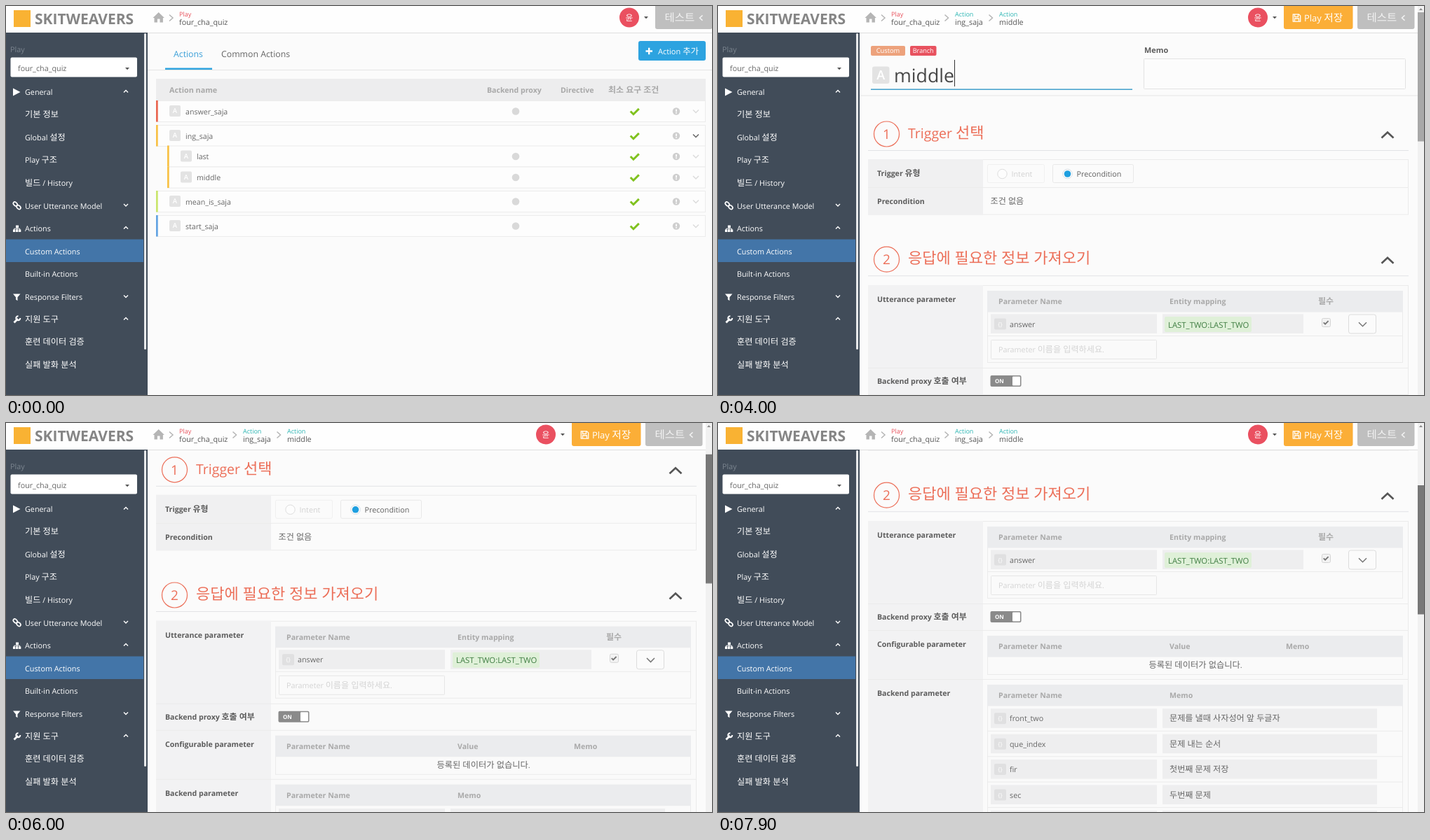
Recreate the animation shown at these times as an HTML page. Size 1007 by 556 pixels, loop 8 s.

```html
<!DOCTYPE html>
<html lang="ko">
<head>
<meta charset="utf-8">
<title>Action editor</title>
<style>
html, body { margin: 0; width: 100%; height: 100%; overflow: hidden; background: #fbfbfb; }
svg { display: block; width: 1007px; height: 556px; }
text { font-family: "Open Sans", "Noto Sans CJK KR", "Noto Sans CJK", sans-serif; text-rendering: geometricPrecision; white-space: pre; }
.ko { font-size: 1.13em; }
.list { animation: list 8s step-end infinite; }
.detail { animation: detail 8s step-end infinite; }
.body { animation: body 8s step-end infinite; }
.loader { animation: loader 8s step-end infinite; }
.caret { animation: caret 8s step-end infinite; }
.focus { animation: focus 8s linear infinite; }
.scroll { animation: scroll 8s infinite; }
.thumb { animation: thumb 8s infinite; }
.grip { animation: grip 8s step-end infinite; }
.spin { animation: spin 1s steps(10) infinite; transform-origin: 599.5px 287px; }
@keyframes list { 0% { visibility: visible } 31.25%, 100% { visibility: hidden } }
@keyframes detail { 0% { visibility: hidden } 31.25%, 100% { visibility: visible } }
@keyframes body { 0% { visibility: hidden } 41.25%, 100% { visibility: visible } }
@keyframes loader { 0% { visibility: hidden } 31.25% { visibility: visible } 41.25%, 100% { visibility: hidden } }
@keyframes caret {
  0%, 42.5%, 55%, 67.5%, 100% { visibility: hidden }
  36.25%, 48.75%, 61.25% { visibility: visible }
}
@keyframes focus { 0%, 37.5% { opacity: 0 } 41.25%, 100% { opacity: 1 } }
@keyframes scroll {
  0%, 57.5% { transform: translateY(0); animation-timing-function: steps(4) }
  62.5% { transform: translateY(-50px); animation-timing-function: steps(6) }
  70% { transform: translateY(-78px); animation-timing-function: steps(9) }
  81.25% { transform: translateY(-164px); animation-timing-function: steps(8) }
  91.25% { transform: translateY(-215px); animation-timing-function: steps(6) }
  98.75% { transform: translateY(-259px); animation-timing-function: steps(1) }
  100% { transform: translateY(-266px) }
}
@keyframes thumb {
  0%, 57.5% { transform: translateY(0); animation-timing-function: steps(4) }
  62.5% { transform: translateY(15px); animation-timing-function: steps(6) }
  70% { transform: translateY(24px); animation-timing-function: steps(9) }
  81.25% { transform: translateY(50.5px); animation-timing-function: steps(8) }
  91.25% { transform: translateY(66.5px); animation-timing-function: steps(6) }
  98.75% { transform: translateY(80px); animation-timing-function: steps(1) }
  100% { transform: translateY(82px) }
}
@keyframes grip { 0% { fill: #c1c1c1 } 50% { fill: #a8a8a8 } 58.75%, 100% { fill: #787878 } }
@keyframes spin { to { transform: rotate(360deg) } }
</style>
</head>
<body>
<svg id="stage" viewBox="0 0 1007 556" xmlns="http://www.w3.org/2000/svg"></svg>
<script>
const text = (x, y, s, fill = '#555', size = 10.75, more = '') =>
  `<text x="${x}" y="${y}" fill="${fill}" font-size="${size}" ${more}>` +
  s.replace(/[가-힣]+( [가-힣]+)*/g, k => `<tspan class="ko">${k}</tspan>`) + '</text>';
const bold = (x, y, s, fill = '#5c5c5c', size = 10.6) => text(x, y, s, fill, size, 'font-weight="700"');
const mid = (x, y, s, fill, size, more = '') => text(x, y, s, fill, size, 'text-anchor="middle" ' + more);
const rect = (x, y, w, h, fill, r = 0, stroke = 'none') =>
  `<rect x="${x}" y="${y}" width="${w}" height="${h}" rx="${r}" fill="${fill}" stroke="${stroke}"/>`;
const box = (x, y, w, h, stroke, r = 0, fill = 'none') => rect(x + .5, y + .5, w - 1, h - 1, fill, r, stroke);
const dot = (x, y, r, fill, stroke = 'none', w = 1) =>
  `<circle cx="${x}" cy="${y}" r="${r}" fill="${fill}" stroke="${stroke}" stroke-width="${w}"/>`;
const line = (d, stroke, w = 1) => `<path d="${d}" fill="none" stroke="${stroke}" stroke-width="${w}"/>`;
const shape = (d, fill) => `<path d="${d}" fill="${fill}"/>`;
const rule = (x1, x2, y, c = '#e6e6e6') => rect(x1, y, x2 - x1, 1, c);
const chevron = (x, y, w, h, c, lw = 1.4) => line(`M${x - w} ${y - h}L${x} ${y + h}L${x + w} ${y - h}`, c, lw);
const angle = (x, y, dir, c, k = 1) =>
  line(`M${x - 2.5 * k * dir} ${y - 4.5 * k}L${x + 2.5 * k * dir} ${y}L${x - 2.5 * k * dir} ${y + 4.5 * k}`, c, 1.5);
const group = (cls, s, more = '') => `<g class="${cls}" ${more}>${s}</g>`;
const move = (x, s) => `<g transform="translate(${x} 0)">${s}</g>`;
const drop = (x, y, c) => shape(`M${x - 3} ${y}h6l-3 3.2z`, c);
const tick = (x, y, k, c, w) => line(`M${x - 5.5 * k} ${y}l${4 * k} ${4 * k}l${7.5 * k} ${-7.5 * k}`, c, w);
const badgeA = (x, y, size, r, fs) =>
  rect(x, y, size, size, '#e3e3e3', r) + mid(x + size / 2, y + size / 2 + fs * .36, 'A', '#fff', fs, 'font-weight="600"');

function sidebar() {
  const rows = [
    [123, 'General', -1], [155, '기본 정보'], [188, 'Global 설정'], [220, 'Play 구조'], [253, '빌드 / History'],
    [285.5, 'User Utterance Model', 1], [318, 'Actions', -1], [351, 'Custom Actions'], [383, 'Built-in Actions'],
    [416, 'Response Filters', 1], [448, '지원 도구', -1], [480, '훈련 데이터 검증'], [513, '실패 발화 분석']
  ];
  const w = '#fff';
  return rect(0, 38, 202, 518, '#414c59') + rect(197, 39, 3, 452, '#e6e8ea', 1.5) +
    rect(0, 333.5, 196, 32.5, '#4375a8') +
    text(6, 66, 'Play', '#7b858f') + rect(6.5, 73.5, 180.5, 28, w, 2) +
    text(17, 92.5, 'four_cha_quiz', '#666') + drop(173, 88, '#555') +
    rows.map(([y, s, dir]) => text(27, y + 4, s, w, 10.8) + (dir ? chevron(171, y - 1, 3, 1.5 * dir, w) : '')).join('') +
    shape('M10 117.5l10.5 5.5l-10.5 5.5z', w) +
    [[13.3, 283], [18, 287.6]].map(([x, y]) =>
      `<ellipse cx="${x}" cy="${y}" rx="3.4" ry="2.3" fill="none" stroke="#fff" stroke-width="1.7" transform="rotate(45 ${x} ${y})"/>`).join('') +
    rect(14, 313.5, 4, 3.5, w) + [10, 14, 18].map(x => rect(x, 319.5, 3.3, 3.5, w)).join('') +
    line('M15.8 316v4M11.7 320v-1.8h8v1.8', w, 1) +
    shape('M10 411.5h10.5l-4 4.8v5l-2.5-1.8v-3.2z', w) +
    line('M11.5 452.5l5.5-5.5', w, 2.8) + line('M20.3 446a3 3 0 1 1-2.8-2.8', w, 2);
}

function header() {
  const c = '#b5b5b5';
  return rect(0, 0, 1007, 38, '#fefefe') + rule(0, 1007, 38, '#dedede') +
    rect(11, 6, 24, 24, '#f9b233') + bold(41, 25.5, 'SKITWEAVERS', '#858585', 21) +
    shape('M209.5 17l8.2-8l8.2 8h-2v6.5h-4.4v-5h-3.6v5h-4.4v-6.5z', c) + angle(235.5, 17, 1, c) +
    text(247, 15, 'Play', '#e8505b', 9) + text(247, 27, 'four_cha_quiz');
}

const avatar = x => dot(x, 16.5, 14, '#ea5060') + mid(x, 21, '윤', '#fff', 10.5) + drop(x + 24, 15, '#555');
const testButton = rect(912, -3, 81.5, 36, '#bfbfbf', 3) + text(925.5, 21.5, '테스트', '#f2f2f2', 13.7) +
  angle(977.5, 17, -1, '#f2f2f2', .8);

function detailHeader() {
  const crumb = (x, s) => angle(x - 12, 17, 1, '#b5b5b5') + text(x, 15, 'Action', '#2bb5b3', 9) + text(x, 27, s);
  return crumb(338, 'ing_saja') + crumb(401, 'middle') + avatar(770) +
    rect(807, -3, 98.5, 36, '#fbae37', 3) +
    line('M820.3 11.8h8.2l2.2 2.2v8.2h-10.4zM822.5 12v3.5h5v-3.5M822.5 22v-4h6v4', '#fff', 1.3) +
    text(836, 21.5, 'Play 저장', '#fff', 13) + testButton;
}

function actionList() {
  const rows = [
    [150.5, 'answer_saja', 0, '#e9654f'], [185.5, 'ing_saja', 0, '#f8c145'], [215, 'last', 16, '#f8c145'],
    [245, 'middle', 16, '#f8c145'], [279.5, 'mean_is_saja', 0, '#c9e56c'], [314.5, 'start_saja', 0, '#62a3e2']
  ];
  const head = '#a8a8a8';
  return rule(202, 1007, 91, '#e4e4e4') + text(239, 73, 'Actions', '#3a9fd8', 12.3) +
    text(307, 73, 'Common Actions', '#666', 12.3) + rect(227, 88.5, 67, 2.5, '#30a4df') +
    rect(902, 50, 96, 28, '#2da3e0', 3) + line('M912.5 64.5h9.5M917.2 59.8v9.5', '#fff', 2.4) +
    text(930, 68.5, 'Action 추가', '#fff', 11) +
    rect(214, 104, 784, 31, '#ededee') + bold(233, 124, 'Action name', head, 10.8) +
    bold(686, 124, 'Backend proxy', head) + bold(791, 124, 'Directive', head) + bold(859, 124, '최소 요구 조건', head) +
    rows.map(([y, s, dx, c]) => {
      const parent = s === 'ing_saja';
      return box(214 + dx, y - 15.5, 784 - dx, 31, '#ececec', 0, '#fdfdfd') + rect(214 + dx, y - 15.5, 2.7, 30.5, c) +
        badgeA(233 + dx, y - 8.5, 16, 2, 9.5) + text(256 + dx, y + 4, s, '#666', 10.6) +
        (parent ? '' : dot(727, y, 5.3, '#d9d9d9')) + tick(896.5, y, 1.05, '#80c21f', 3) +
        dot(956, y, 5.2, '#cfcfcf') + rect(955.2, y - 3, 1.7, 3.6, '#fff') + rect(955.2, y + 1.5, 1.7, 1.6, '#fff') +
        chevron(984, y, 4, 2, parent ? '#666' : '#dcdcdc', 1.5);
    }).join('') + move(14, testButton) + avatar(889);
}

const section = (y, n, s) => dot(240.5, y, 18, 'none', '#ec6f59', 1.2) + mid(240.5, y + 6.8, n, '#ec6f59', 19) +
  text(271, y + 6, s, '#ec6f59', 19.5) + chevron(955, y + 1.5, 8.5, -4, '#555', 2.6) + rule(214, 985, y + 23, '#e2e3e6');

const label = (y, s) => bold(227, y, s);
const tableHead = (y, cols) => rect(384, y, 593, 30.5, '#ebecee') + cols.map(([x, s]) => bold(x, y + 19, s, '#a9a9a9')).join('');
const field = (y, name) => rect(389, y, 237, 27.5, '#eeeeef') + rect(394, y + 6, 17, 16, '#e0e0e1', 2) +
  mid(402.5, y + 17, '{}', '#fff', 8.5) + text(416, y + 18, name, '#666');

function triggerForm() {
  return rect(218, 57, 49, 14, '#eda27c', 2) + mid(242.5, 67.3, 'Custom', '#fff', 9.3) +
    rect(274, 57, 37.5, 14, '#e8525f', 2) + mid(292.7, 67.3, 'Branch', '#fff', 9.1) +
    badgeA(220, 86.5, 24.5, 3, 18) + text(251, 108.7, 'middle', '#484848', 26.7) +
    rule(218, 591, 118.5, '#dfdfdf') + group('focus', rect(218, 118.5, 373, 1.5, '#45a3cf')) +
    group('caret', rect(337, 77, 1, 38, '#333')) +
    bold(608, 67, 'Memo', '#5c5c5c', 10.9) + box(607, 75, 374, 44, '#e3e3e3', 1, '#fcfcfc') + rule(202, 998, 127.5, '#e6e6e6') +
    section(183, '1', 'Trigger 선택') +
    box(214, 219, 771, 79.5, '#ebebeb', 0, '#fbfbfb') + rect(214, 219, 164, 79.5, '#f0f0f1') + rule(214, 985, 259, '#ebebeb') +
    label(243, 'Trigger 유형') + label(283, 'Precondition') +
    box(384, 226, 82, 27, '#f0f0f0', 2) + dot(405.5, 240, 6.7, '#fdfdfd', '#dedede') + text(418.5, 244, 'Intent', '#d2d2d2') +
    box(477, 226, 116, 27, '#e8e8e8', 2) + dot(498.5, 240, 6.7, '#fdfdfd', '#d5dfe6') + dot(498.5, 240, 4.8, '#1e9fe0') +
    text(511.5, 244, 'Precondition', '#606060') + text(388.5, 283, '조건 없음', '#666') +
    section(362.2, '2', '응답에 필요한 정보 가져오기');
}

function infoForm() {
  const params = [['front_two', '문제를 낼때 사자성어 앞 두글자'], ['que_index', '문제 내는 순서'],
    ['fir', '첫번째 문제 저장'], ['sec', '두번째 문제'], ['', '']];
  const soft = '#ebebeb', name = [400, 'Parameter Name'];
  return box(214, 399, 771, 480, soft, 0, '#fafafa') + rect(214, 399, 164, 480, '#f2f2f3') +
    [517, 555, 625].map(y => rule(214, 985, y, soft)).join('') +
    label(423, 'Utterance parameter') + label(540, 'Backend proxy 호출 여부') +
    label(579, 'Configurable parameter') + label(649, 'Backend parameter') +
    box(384, 407, 593, 103, soft) + tableHead(407, [name, [644, 'Entity mapping'], [856, '필수']]) +
    field(440.5, 'answer') + rect(634, 440.5, 201, 27.5, '#eeeeef') + rect(637, 444, 124, 22, '#dff0d8', 2) +
    text(642, 459.5, 'LAST_TWO:LAST_TWO', '#3f7d42', 11.35) +
    box(861, 446, 13, 13, '#d4d4d4', 2, '#f3f3f3') + tick(867, 452.3, .6, '#777', 1.9) +
    box(899, 440.5, 40, 28, '#dcdcdc', 3, '#fbfbfb') + chevron(919.5, 455, 5.5, 2.8, '#777', 1.5) +
    rule(384, 977, 471, soft) + box(389, 477, 237, 28, '#e6e6e6', 1) + text(400, 495, 'Parameter 이름을 입력하세요.', '#d4d4d4') +
    rect(388.5, 528, 44, 16, '#8a8a8a', 2) + bold(395, 539, 'ON', '#fff', 8) + rect(420, 529.5, 11, 13, '#fff', 1) +
    box(384, 563, 593, 56, soft) + tableHead(563, [name, [644, 'Value'], [810, 'Memo']]) +
    mid(681, 609, '등록된 데이터가 없습니다.', '#666', 10.85) +
    box(384, 633, 593, 240, soft) + tableHead(633, [name, [644, 'Memo']]) +
    params.map(([p, memo], i) => {
      const y = 667.3 + 36.4 * i;
      return field(y, p) + rect(634, y, 306, 27.5, '#eeeeef') + text(644, y + 18, memo, '#666') + rule(384, 977, y + 31.5, soft);
    }).join('');
}

const spinner = group('loader', dot(599.5, 287, 25, 'none', '#bddcfb', 2.6) +
  group('spin', line('M577.85 299.5A25 25 0 0 1 587 265.35', '#0a7cf5', 2.6)));

const scrollbar = rect(998, 0, 9, 556, '#f1f1f1') + shape('M1000 6h5l-2.5-3z', '#8a8a8a') +
  group('thumb', '<rect class="grip" x="998" y="9" width="9" height="184.5"/>');

document.getElementById('stage').innerHTML =
  '<clipPath id="view"><rect x="202" y="39" width="796" height="517"/></clipPath>' +
  rect(0, 0, 1007, 556, '#fbfbfb') +
  group('detail', group('scroll', triggerForm() + group('body', infoForm())), 'clip-path="url(#view)"') +
  spinner + header() + sidebar() + group('list', actionList()) + group('detail', detailHeader() + scrollbar);
</script>
</body>
</html>
```
